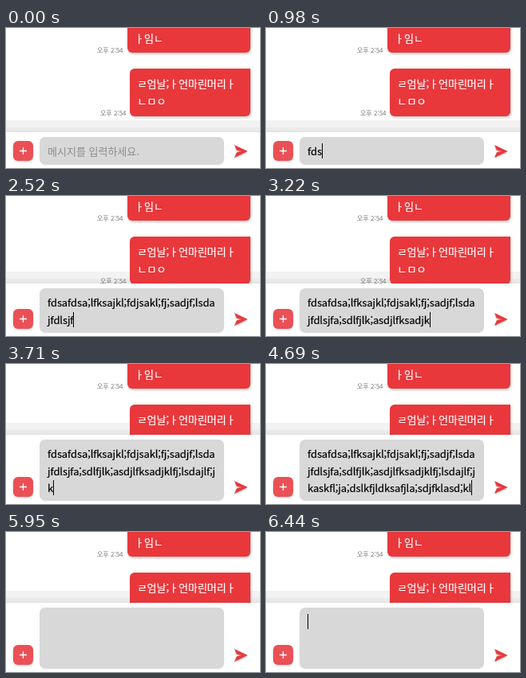
Recreate the animation shown at these times as an HTML page. Size 318x176 px, loop 6.93 s.

```html
<!DOCTYPE html>
<html lang="ko">
<meta charset="utf-8">
<style>
  html, body { margin: 0; width: 100%; height: 100%; overflow: hidden; background: #fff; }
  body {
    position: relative; font: 13px/21.5px "Noto Sans CJK KR", "Noto Sans CJK", sans-serif;
    font-feature-settings: "calt" 0; -webkit-text-stroke: .2px;
  }
  div, svg { position: absolute; box-sizing: border-box; white-space: pre; }
  .msg { background: #e8383c; color: #fff; padding-left: 9.5px; box-shadow: 1px 2px 3px #0003; }
  .time { font-size: 8px; color: #777; -webkit-text-stroke: 0; }
  #band { left: 0; right: 0; bottom: 0; background: linear-gradient(#f2f2f2 8px, #eaeaea 10px); }
  #bar { left: 0; right: 0; bottom: 0; background: #fff; box-shadow: 0 -1px 3px #0000000d; }
  #input { left: 42px; top: 6px; width: 231px; bottom: 4px; border-radius: 7px; background: #d8d8d8; }
  #hint { left: 10px; top: 7px; color: #8c8c8c; -webkit-text-stroke: 0; }
  #text { left: 10px; top: 7px; color: #000; letter-spacing: -.12px; }
  #text p { margin: 0; height: 21.5px; }
  .picked p { width: 214px; background: #80bcfe99; }
  .picked p:last-child { width: max-content; }
  #caret { width: 1px; height: 19px; background: #000; }
  #plus { left: 9px; bottom: 9px; width: 25px; height: 25px; border-radius: 6px; background: #ea5055; box-shadow: 0 1px 3px #0003; }
  #plus svg { left: 0; top: 0; }
  #send { left: 285px; bottom: 12px; filter: drop-shadow(.5px 1px 1px #0004); }
</style>
<body>
<div id="band"></div>
<div class="msg" style="left:151.5px;top:-20px;width:154.5px;height:51px;border-radius:6px;padding-top:22px">ㅏ임ㄴ</div>
<div class="msg" style="left:155px;top:51px;width:151px;height:60px;border-radius:6px 0 6px 6px;padding-top:8px">ㄹ엄날;ㅏ언마린머리ㅏ
ㄴㅁㅇ</div>
<div class="time" style="left:114px;top:17px">오후 2:54</div>
<div class="time" style="left:118px;top:96px">오후 2:54</div>
<div id="bar">
  <div id="plus"><svg width="25" height="25"><path d="M12.5 8v9M8 12.5h9" stroke="#fff" stroke-width="1.4"/></svg></div>
  <div id="input"><div id="hint">메시지를 입력하세요.</div><div id="text"></div><div id="caret"></div></div>
  <svg id="send" width="18" height="18"><path d="M1.5 1.5 17 9 1.5 16.5 4 10.5 11 9 4 7.5Z" fill="#e8383c" stroke="#e8383c" stroke-width=".5" stroke-linejoin="round"/></svg>
</div>
<script>
const $ = id => document.getElementById(id);
const LOOP = 6930, STEP = 70, LINE = 21.5;
const FOCUS = 280, SELECT = 5040, CLEAR = 5390, BLINK = 525;
const LINES = [
  'fdsafdsa;lfksajkl;fdjsakl;fj;sadjf;lsda',
  'jfdlsjfa;sdlfjlk;asdjlfksadjklfj;lsdajlf;j',
  'kaskfl;ja;dslkfjldksafjla;sdjfklasd;kl'
];
// [time, characters typed]
const KEYS = [[840, 0], [1050, 4], [1120, 4], [1750, 22], [2520, 46], [2870, 59], [2940, 59],
  [3640, 81], [3710, 82], [4200, 102], [4270, 102], [4690, 119]];

function typed(t) {
  if (t <= KEYS[0][0]) return 0;
  const i = KEYS.findIndex(k => k[0] >= t);
  if (i < 0) return KEYS.at(-1)[1];
  const [t0, n0] = KEYS[i - 1], [t1, n1] = KEYS[i];
  return Math.round(n0 + (n1 - n0) * (t - t0) / (t1 - t0));
}

function draw(now) {
  const t = Math.floor(now % LOOP / STEP) * STEP;
  const count = typed(t), cleared = t >= CLEAR, selected = t >= SELECT && !cleared;
  let left = count;
  const shown = [];
  for (const line of LINES) {
    if (left > 0) shown.push(line.slice(0, left));
    left -= line.length;
  }
  const rows = Math.max(1, shown.length);
  const height = 45 + (rows - 1) * 21;
  $('bar').style.height = height + 'px';
  $('band').style.height = height + 15 + 'px';

  const text = $('text');
  text.className = selected ? 'picked' : '';
  text.replaceChildren(...(cleared ? [] : shown).map(s => {
    const p = document.createElement('p');
    p.append(Object.assign(document.createElement('span'), { textContent: s }));
    return p;
  }));
  $('hint').hidden = t >= FOCUS;

  const last = text.lastChild;
  const idle = cleared ? t - CLEAR : count ? 0 : t - FOCUS;
  const on = t >= FOCUS && !selected && idle % (2 * BLINK) < BLINK;
  const caret = $('caret').style;
  caret.visibility = on ? 'visible' : 'hidden';
  caret.left = 10 + (last ? last.firstChild.getBoundingClientRect().width : 0) + 'px';
  caret.top = 8 + (last ? rows - 1 : 0) * LINE + 'px';
}

function frame() {
  draw(performance.now());
  requestAnimationFrame(frame);
}
frame();
</script>
</body>
</html>
```
